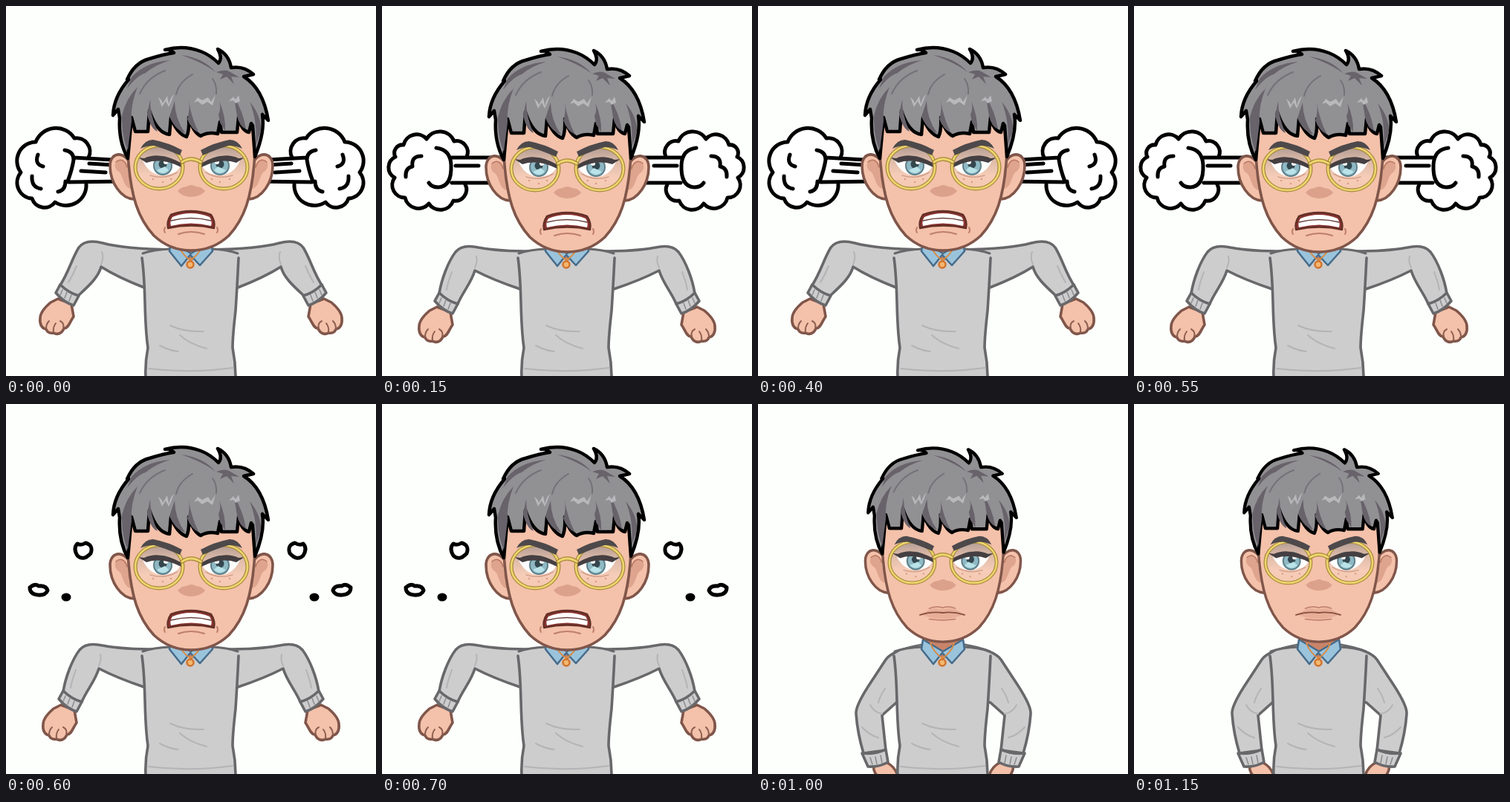
Write an HTML page that moves like this. It is 498 by 498 pixels and loops after 1.2 s.

```html
<!DOCTYPE html>
<html lang="en">
<head>
<meta charset="utf-8">
<title>Fuming avatar</title>
<style>
html, body { margin: 0; width: 100%; height: 100%; overflow: hidden; background: #fdfffc; }
svg { display: block; width: 100vw; height: 100vh; }
path, circle, ellipse { stroke-linecap: round; stroke-linejoin: round; }
.line { fill: none; }
.skin { fill: #f4c1aa; stroke: #80564a; stroke-width: 3.6; }
.wool { fill: #cdcdce; stroke: #68686b; stroke-width: 3.6; }
.fold { fill: none; stroke: #b4b4b6; stroke-width: 2; }
.ink { fill: none; stroke: #000; stroke-width: 5; }
.white { fill: #fff; }
.lock { fill: #68626b; }
.shine { fill: #b9b8bb; }
</style>
</head>
<body>
<svg viewBox="0 0 498 498">
  <defs>
    <linearGradient id="lens" x2="0" y2="1">
      <stop offset="0" stop-color="#b39d94"/>
      <stop offset=".35" stop-color="#dfbcaa"/>
      <stop offset=".7" stop-color="#f6cdb8"/>
      <stop offset="1" stop-color="#f5c8b2"/>
    </linearGradient>

    <g id="ear">
      <path class="skin" d="M168 216C160 196 140 198 140 217C140 240 155 261 172 262L185 240Z"/>
      <path d="M147 214C151 205 160 209 163 218L168 248C158 246 158 232 153 226C148 223 146 219 147 214Z" fill="#dea48e"/>
      <path class="line" d="M148 212C155 206 161 211 163 219" stroke="#b87660" stroke-width="1.5"/>
    </g>

    <g id="eye">
      <ellipse cx="206" cy="219" rx="32" ry="29" fill="url(#lens)"/>
      <path d="M184 210Q206 200 235 215Q233 228 212 230Q193 230 184 210Z" fill="#fdfdfd"/>
      <circle cx="211" cy="217" r="12" fill="#8fb9c4" stroke="#5d7f89" stroke-width="2"/>
      <circle cx="211" cy="215" r="5.5" fill="#34474f"/>
      <path d="M203 223Q211 231 219 223L214 218Z" fill="#b9e3e8"/>
      <circle cx="215" cy="212" r="3" fill="#fff"/>
      <path d="M178 206L186 207Q207 197 237 214L236 219Q210 206 189 213Z" fill="#453f41"/>
      <path class="line" d="M194 230Q214 236 230 226" stroke="#d3a08c" stroke-width="1.5"/>
      <path class="line" d="M198 235h.1M211 239h.1M222 235h.1" stroke="#dd9b80" stroke-width="2.4"/>
      <ellipse class="line" cx="206" cy="219" rx="32" ry="29" stroke="#a8893a" stroke-width="5"/>
      <ellipse class="line" cx="206" cy="219" rx="32" ry="29" stroke="#eed66e" stroke-width="2.6"/>
      <path d="M181 194Q187 182 198 182Q219 186 237 196L234 203Q214 194 199 190Q189 190 181 194Z" fill="#4d494b"/>
    </g>

    <g id="fist">
      <path class="skin" d="M70 394L88 401L91 418C86 425 84 434 78 434C75 441 69 443 64 440C58 441 55 438 54 435C48 434 45 428 46 420C46 412 53 405 60 399Z"/>
      <path class="line" d="M54 434Q54 428 58 424M64 439Q63 432 67 427M77 434Q79 427 73 424" stroke="#8d5f50" stroke-width="2"/>
    </g>
    <g id="cuff">
      <path class="wool" d="M73 375L67 386Q78 399 91 403L98 390Q84 386 73 375Z"/>
      <path class="line" d="M76 382l-3 7M82 385l-3 8M88 389l-3 8" stroke="#8b8b8e" stroke-width="1.5"/>
    </g>

    <g id="armUp">
      <use href="#fist"/>
      <path class="wool" d="M222 328Q160 327 130 319Q107 313 98 325C88 341 84 360 72 377Q82 388 97 390C110 378 124 366 128 351Q150 365 186 379L222 390"/>
      <path class="fold" d="M128 348Q132 338 129 331M95 350Q88 366 84 372"/>
      <use href="#cuff"/>
    </g>
    <g id="armLow">
      <use href="#fist" x="4" y="11"/>
      <path class="wool" d="M222 330Q160 331 130 325Q108 320 99 331C89 344 80 368 77 387Q87 399 102 401C108 386 120 373 125 356Q150 369 186 381L222 390"/>
      <path class="fold" d="M125 352Q129 344 127 337M94 358Q88 374 87 382"/>
      <use href="#cuff" x="4" y="11"/>
    </g>
    <g id="armDown">
      <path class="skin" d="M156 484Q154 493 160 500H188Q184 488 174 483Z"/>
      <path class="wool" d="M222 324Q181 331 172 344L149 379Q131 407 132 417Q134 444 142 470L172 466L167 419L186 402L222 390"/>
      <path class="fold" d="M167 417Q156 415 151 405M171 383Q164 393 162 402M140 435Q150 446 162 449"/>
      <path class="wool" d="M140 470L148 488Q163 489 175 482L172 465Q156 472 140 470Z"/>
      <path class="line" d="M151 476l3 9M158 475l2 10M165 473l2 10" stroke="#8b8b8e" stroke-width="1.5"/>
    </g>

    <g id="steamUp">
      <path class="white" d="M84 203H160V237H84Z"/>
      <path class="cloud ink white" data-bumps="40,183 92,178 111,204 | 108,240 66,264 35,259 20,224 40,183"/>
      <path class="white" d="M84 204L118 206V236H82Z"/>
      <path class="ink" d="M79 194Q91 196 91 207Q89 220 83 236M91 204L160 208M84 237L160 236M112 212L160 215M43 200Q38 213 50 216M35 229Q34 244 47 246M80 236Q80 248 70 250"/>
      <path class="ink" d="M101 222L134 224" stroke-width="3"/>
    </g>
    <g id="steamLow">
      <path class="white" d="M88 204H160V238H88Z"/>
      <path class="cloud ink white" data-bumps="29,187 60,179 97,182 114,203 | 112,240 96,262 63,266 31,258 17,231 18,203 29,187"/>
      <path class="white" d="M90 204H122V238H90Z"/>
      <path class="ink" d="M73 191Q92 193 93 214Q94 243 76 244Q67 244 63 238M94 204H160M94 238H160M99 215H130M53 202Q39 202 41 216Q31 218 32 230"/>
    </g>
    <g id="puffs">
      <path class="ink white" d="M96 188Q101 191 107 187Q118 190 114 201Q104 212 96 204Q90 194 96 188Z"/>
      <path class="ink white" d="M32 247Q39 241 44 245Q54 244 56 251Q53 258 43 257Q32 256 32 247Z"/>
      <ellipse cx="81" cy="260" rx="6.5" ry="5.5"/>
    </g>
  </defs>

  <g class="pair" data-part="steamUp" data-axis="496"></g>
  <g class="pair" data-part="steamLow" data-axis="496"></g>
  <g class="pair" data-part="puffs" data-axis="496"></g>
  <g class="pair" data-part="armUp" data-axis="498"></g>
  <g class="pair" data-part="armLow" data-axis="498"></g>
  <g class="pair" data-part="armDown" data-axis="499"></g>

  <!-- torso -->
  <path d="M222 325Q190 329 183 339Q186 360 187 400Q188 440 191 460Q187 480 188 500H309Q309 480 305 460Q305 445 309 410Q311 380 313 339Q306 329 276 325Z" fill="#cdcdce"/>
  <path class="line" d="M183 339Q186 360 187 400Q188 440 191 460Q187 480 188 500M313 339Q311 380 309 410Q305 445 305 460Q309 480 309 500" stroke="#68686b" stroke-width="3.6"/>
  <path class="line" d="M184 333Q198 328 221 327M312 333Q298 328 277 327" stroke="#68686b" stroke-width="3"/>
  <path class="fold" d="M221 430Q240 439 266 438M234 443Q247 455 270 461M207 457Q220 464 232 465M192 488Q248 495 305 487"/>
  <path d="M226 318H274L249 345Z" fill="#c88469"/>
  <path d="M222 317L220 330L236 350L248 335L261 349L278 330L276 317L249 333Z" fill="#9ac3dc" stroke="#466b8a" stroke-width="2.5"/>
  <path class="line" d="M232 322Q237 335 248 342Q260 335 264 322" stroke="#d98b42" stroke-width="2"/>
  <circle cx="248" cy="348" r="4.5" fill="#f3b56d" stroke="#d0742d" stroke-width="2.5"/>

  <g id="head">
    <g class="pair" data-part="ear" data-axis="499"></g>
    <path class="skin" d="M161 150L165 215C169 258 177 287 199 311C215 326 232 331 249 331C267 331 284 326 300 311C322 287 330 258 334 215L338 150Z"/>

    <!-- hair -->
    <path d="M144 149Q145 124 165 101Q165 99 163 101Q173 78 193 73Q212 67 226 65Q221 60 214 61Q239 54 262 63Q275 68 286 79Q292 72 285 60Q300 67 303 85Q320 82 333 94L320 97Q346 113 353 156L345 148Q349 171 335 205L332 163L330 160L327 172Q317 170 313 152L311 172H290L288 158L285 174Q272 171 262 177Q252 172 246 152Q247 170 243 178Q230 174 222 152L220 175Q203 173 193 143L191 171H174L169 152L164 207Q151 184 153 153L151 141Z" fill="#919093" stroke="#000" stroke-width="4.5"/>
    <path class="lock" d="M156 150Q161 127 177 111Q167 136 169 157L164 196Q156 180 156 150ZM190 148L194 128Q194 149 204 171Q195 168 190 148ZM220 151L227 130Q227 153 241 173Q228 169 220 151ZM244 154Q248 142 246 130Q250 155 260 173Q249 168 244 154ZM286 148Q290 140 287 130Q296 151 295 170L288 159ZM311 150L307 125Q319 143 323 168Q314 164 311 150ZM336 190Q339 158 328 131Q344 150 343 170Z"/>
    <path class="lock" d="M169 98Q186 78 221 75Q201 81 188 92Q177 95 163 113ZM236 68Q266 72 282 91Q267 79 236 68ZM283 91Q296 86 302 91L314 98L303 97L307 107L297 97L288 101L292 94Z"/>
    <path class="line" d="M180 120Q190 98 214 89M229 121Q233 104 251 94M283 120Q284 108 278 100" stroke="#747277" stroke-width="2"/>
    <path class="shine" d="M205 125Q210 128 211 133L217 123L219 134Q222 124 226 121Q223 130 219 138L215 130L210 138ZM253 132L258 125L264 129L272 125L276 131L282 122L278 136L271 131L264 135L258 130ZM300 130L306 124L309 128L313 122L315 130L309 133L306 129Z"/>

    <g class="pair" data-part="eye" data-axis="499"></g>
    <path class="line" d="M237 212Q249 204 262 212" stroke="#a8893a" stroke-width="5.5"/>
    <path class="line" d="M237 212Q249 204 262 212" stroke="#eed66e" stroke-width="2.8"/>
    <path d="M231 251Q236 245 243 245Q249 241 256 245Q263 245 268 251Q263 258 249 259Q236 258 231 251Z" fill="#dca18b"/>

    <g id="snarl">
      <path d="M222 283Q249 273 276 283Q282 292 280 301Q250 294 218 301Q216 292 222 283Z" fill="#8a332d" stroke="#622f28" stroke-width="2.4"/>
      <path d="M224 286Q249 276 274 286Q278 292 276 298Q249 291 222 298Q220 292 224 286Z" fill="#fff"/>
      <path class="line" d="M222 291Q249 284 276 291" stroke="#673e39" stroke-width="1.5"/>
      <path class="line" d="M232 309Q249 303 267 309M214 300Q212 304 214 307M284 300Q286 304 284 307" stroke="#bd7f6b" stroke-width="2"/>
    </g>
    <g id="frown">
      <path d="M218 292Q235 282 241 284L249 285L257 284Q264 282 279 292Q265 299 249 299Q232 299 218 292Z" fill="#e8ae97"/>
      <path class="line" d="M217 293Q234 288 249 290Q264 288 280 293" stroke="#85503f" stroke-width="2"/>
      <path class="line" d="M230 284Q240 280 249 283Q258 280 267 284M230 299Q249 302 267 299" stroke="#bd7d68" stroke-width="1.5"/>
    </g>
  </g>
</svg>
<script>
const $ = id => document.getElementById(id);

// Each stretch between two points becomes one round bump.
const bumps = text => text.split('|').map(run => {
  const [first, ...rest] = run.trim().split(' ').map(p => p.split(',').map(Number));
  let [x, y] = first;
  return `M${x} ${y}` + rest.map(([u, v]) => {
    const r = Math.hypot(u - x, v - y) * .56;
    [x, y] = [u, v];
    return `A${r} ${r} 0 0 1 ${u} ${v}`;
  }).join('');
});

for (const cloud of document.querySelectorAll('.cloud')) {
  const [top, bottom] = bumps(cloud.dataset.bumps);
  // Join both runs for the fill; the jet covers the open side.
  cloud.setAttribute('d', bottom + top.slice(top.indexOf('A')));
}

for (const pair of document.querySelectorAll('.pair')) {
  const { part, axis } = pair.dataset;
  pair.innerHTML = `<use href="#${part}"/><use href="#${part}" transform="matrix(-1 0 0 1 ${axis} 0)"/>`;
}

const up = { arm: 'armUp', steam: 'steamUp', mouth: 'snarl', head: 'translate(0 -2)' };
const low = { arm: 'armLow', steam: 'steamLow', mouth: 'snarl', head: '' };
const fading = { ...low, steam: 'puffs' };
const calm = { arm: 'armDown', steam: '', mouth: 'frown', head: 'matrix(.955 0 0 .955 10.7 4)' };

const HOLD = 150;
const poses = [up, low, up, low, fading, calm, calm, calm];

const show = (el, on) => { el.style.display = on ? '' : 'none'; };

function draw(now) {
  const pose = poses[Math.floor(now / HOLD) % poses.length];
  for (const pair of document.querySelectorAll('svg > .pair'))
    show(pair, [pose.arm, pose.steam].includes(pair.dataset.part));
  for (const id of ['snarl', 'frown']) show($(id), pose.mouth === id);
  $('head').setAttribute('transform', pose.head);
}

let start;
function tick(now) {
  start ??= now;
  draw(now - start);
  requestAnimationFrame(tick);
}
draw(0);
requestAnimationFrame(tick);
</script>
</body>
</html>
```
